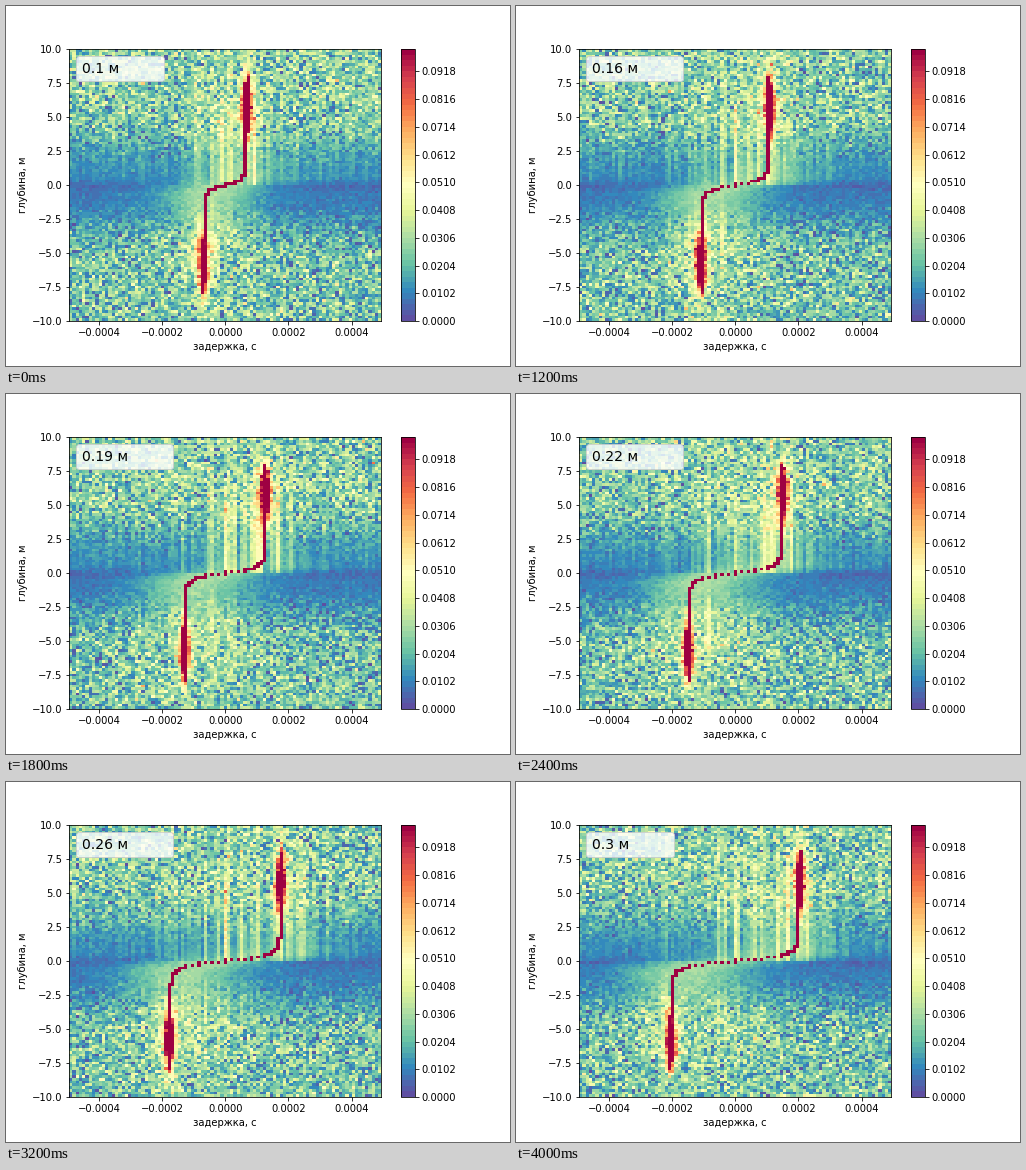
Write a matplotlib script that moves like this. It is 504 px wide and 360 px high and loops after 4.2 s.

```python
import numpy as np
import matplotlib.pyplot as plt
from matplotlib.animation import FuncAnimation
from matplotlib.colors import BoundaryNorm

FRAMES, INTERVAL = 21, 200
SOUND_SPEED = 1470.0
OFFSET = 0.4
STEP = 1 / 96000
ROW = 0.2

cols = np.arange(-47, 48)
tau = cols * STEP
x_edges = (np.arange(cols.size + 1) - cols.size / 2) * STEP
y_edges = np.linspace(-10, 10, 101)
depth = (y_edges[:-1] + y_edges[1:]) / 2
H = depth[:, None]


def smoothstep(lo, hi, v):
    t = np.clip((v - lo) / (hi - lo), 0, 1)
    return t * t * (3 - 2 * t)


def bell(v, center, width):
    return np.exp(-((v - center) / width) ** 2)


def delay(base, h):
    return base / SOUND_SPEED * h / np.hypot(h, OFFSET)


def background(base, rng):
    """Mean correlation level: streaks above, a soft halo below."""
    limit = base / SOUND_SPEED
    near = np.abs(H)
    streak = rng.rayleigh(0.8, tau.size)
    upper_env = (0.6 * bell(tau, 0.9 * limit, 0.7e-4)
                 + 0.5 * bell(tau, 0.2 * limit, 1e-4 + 0.6 * limit))
    lower_env = bell(tau, -0.65 * limit, 1.1e-4 + 0.4 * limit)
    fade = 1 - 0.7 * smoothstep(3, 9, near)
    upper = 0.009 + (0.003 + 0.016 * upper_env * fade) * streak
    lower = (0.009 + 0.014 * lower_env * fade
             + 0.011 * lower_env * fade * (streak - 0.8)
             * smoothstep(0.3, 4, near))
    level = np.where(H > 0, upper, lower)

    # Horizontal wedges spreading from the crossing point
    spread = 1.8e-4 * np.exp(-near / 1.5) + 0.5e-4
    level = level + 0.010 * bell(tau, delay(base, H), spread) * np.exp(-near / 3)
    far = 1 - bell(tau, 0, 1e-4 + 0.6 * limit)
    level *= 1 - 0.4 * far * bell(H, 0, 0.4)

    center = -1 if base < 0.12 else 0
    strength = rng.uniform(0.012, 0.032)
    column = strength * smoothstep(0, 0.4, H) * smoothstep(8, 4, H)
    return level + column * (cols == center)


def ridge(base, rng):
    """Saturated peak following the delay curve."""
    out = np.zeros((depth.size, tau.size))
    for r, h in enumerate(depth):
        ends = [delay(base, h + s * ROW / 2) / STEP for s in (-1, 1)]
        first, last = (int(round(e)) for e in ends)
        hit = (cols >= first) & (cols <= last)
        if last - first > 3:
            hit &= cols % 2 == 0
        a = abs(h)
        out[r, hit] = 0.2 * smoothstep(8.4, 6.9, a) * rng.uniform(0.85, 1.15)
        if a > 2.5:
            gap = np.abs(cols - delay(base, h) / STEP)
            swell = bell(a, 5.8, 1.9)
            out[r] += 0.13 * swell * bell(gap, 0, 1.25)
            out[r] += 0.02 * swell * bell(gap, 0, 2.5)
    return out


def field(i):
    base = 0.1 + 0.01 * i
    rng = np.random.default_rng(100 + i)
    rough = smoothstep(0.5, 5.8, np.abs(H))
    mean = background(base, rng) + ridge(base, rng) + 0.010 * rough
    noise = 0.0015 + 0.0105 * rough
    re, im = rng.normal(size=(2, depth.size, tau.size))
    return np.hypot(mean + noise * re, noise * im)


fig = plt.figure(figsize=(7, 5), dpi=72)
fig.subplots_adjust(left=0.125, right=0.9, bottom=0.125, top=0.88)
ax = fig.add_subplot()
levels = np.linspace(0, 0.1, 50)
mesh = ax.pcolormesh(x_edges, y_edges, field(0), cmap="Spectral_r",
                     norm=BoundaryNorm(levels, 256))
bar = fig.colorbar(mesh, ax=ax, ticks=levels[::5], format="%.4f")
bar.ax.minorticks_off()
ax.set_xlabel("задержка, с")
ax.set_ylabel("глубина, м")
ax.plot([], [], " ", label="0.1 м")
legend = ax.legend(loc="upper left", fontsize=14, markerfirst=False)
caption = legend.get_texts()[0]


def update(i):
    mesh.set_array(field(i))
    caption.set_text(f"{round(0.1 + 0.01 * i, 2)} м")
    return mesh, caption


anim = FuncAnimation(fig, update, frames=FRAMES, interval=INTERVAL,
                     repeat=True, repeat_delay=0)
plt.show()
```
